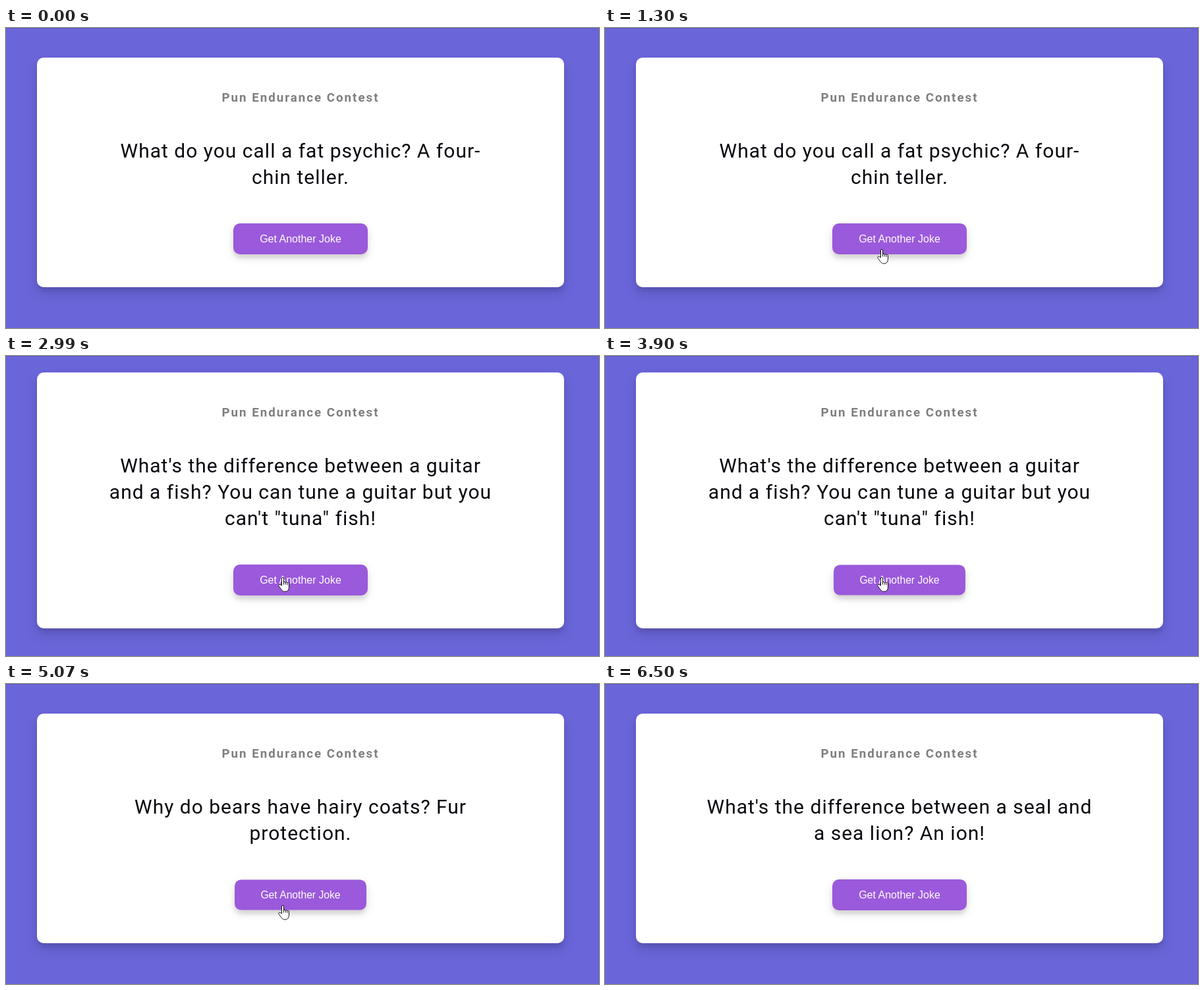
Write an HTML page that moves like this. It is 900 px wide and 456 px high and loops after 6.63 s.

```html
<!DOCTYPE html>
<html lang="en">
<head>
<meta charset="utf-8">
<title>Joke card</title>
<style>
  html, body { margin: 0; width: 100%; height: 100%; overflow: hidden; }
  body {
    position: relative;
    background: #6a65d9;
    box-shadow: inset -1px 1px #605bc8;
    font-family: Roboto, sans-serif;
  }
  #card {
    position: absolute;
    left: 47px;
    width: 800px;
    box-sizing: border-box;
    padding: 50px 20px;
    border-radius: 10px;
    background: #fff;
    box-shadow: 0 10px 20px rgba(0, 0, 0, .1), 0 6px 6px rgba(0, 0, 0, .1);
    text-align: center;
  }
  h3 {
    margin: 0;
    font-size: 18.72px;
    line-height: 22px;
    letter-spacing: 2px;
    opacity: .5;
  }
  #joke {
    margin: 50px 0;
    font-size: 30px;
    line-height: 40px;
    letter-spacing: 1px;
    white-space: pre;
    color: #08080f;
  }
  #button {
    width: 204px;
    margin: 0 auto;
    border-radius: 10px;
    background: #9b59db;
    box-shadow: 0 5px 15px rgba(0, 0, 0, .1), 0 6px 6px rgba(0, 0, 0, .1);
    color: #fff;
    font: 16px/47px "Liberation Sans", Arial, sans-serif;
  }
  svg {
    position: absolute;
    left: 0;
    top: 0;
    overflow: visible;
    fill: #fff;
    stroke: #111;
    stroke-linejoin: round;
  }
</style>
</head>
<body>
<div id="card">
  <h3>Pun Endurance Contest</h3>
  <div id="joke"></div>
  <div id="button">Get Another Joke</div>
</div>
<svg id="cursor" width="20" height="24">
  <path id="arrow" d="M.5 .5V17L4.3 13.5 7 19.5 9.6 18.4 7 12.5H12Z"/>
  <path id="hand" transform="translate(-6 0)" d="M5.5 13V2a1.5 1.5 0 0 1 3 0V8.5a1.4 1.4 0 0 1 2.8.3 1.4 1.4 0 0 1 2.7.5 1.3 1.3 0 0 1 2.5.7V15c0 4-2 7-5.5 7H9.5C6.5 22 5 19 1 13.5 0 11.5 2.5 10.5 4 12ZM8.5 8.5V11.5M11.3 9V11.5M14 9.5V12"/>
</svg>
<script>
  const LOOP = 6630, STEP = 130;
  const REST = [419, 336];

  const jokes = [
    { at: 0, top: 45, text: "What do you call a fat psychic? A four-\nchin teller." },
    { at: 2990, top: 25, text: "What's the difference between a guitar\nand a fish? You can tune a guitar but you\ncan't \"tuna\" fish!" },
    { at: 4160, top: 45, text: "Why do bears have hairy coats? Fur\nprotection." },
    { at: 5330, top: 45, text: "What's the difference between a seal and\na sea lion? An ion!" }
  ];
  const presses = [2600, 3900, 5070];

  // Cursor positions, one per step
  const enter = { at: 390, path: [[34, 415], [125, 402], [235, 383], [332, 362], [394, 346], [414, 339], [418, 337], REST] };
  const leave = { at: 5590, path: [[338, 364], [220, 417], [120, 433], [46, 439], [6, 443]] };

  const $ = id => document.getElementById(id);
  const show = (el, on) => el.style.display = on ? "" : "none";

  function cursorAt(t) {
    if (t < enter.at) return null;
    if (t < leave.at) return enter.path[(t - enter.at) / STEP] || REST;
    return leave.path[(t - leave.at) / STEP];
  }

  function draw(now) {
    const t = Math.floor(now % LOOP / STEP) * STEP;
    const joke = jokes.findLast(j => j.at <= t);
    $("joke").textContent = joke.text;
    $("card").style.top = joke.top + "px";
    $("button").style.transform = presses.includes(t) ? "scale(.98)" : "";

    const pos = cursorAt(t);
    show($("cursor"), pos);
    if (pos) {
      const [x, y] = pos;
      const over = x >= 345 && x < 549 && y < 344;
      show($("hand"), over);
      show($("arrow"), !over);
      $("cursor").style.transform = `translate(${x}px, ${y}px)`;
    }
  }

  const start = performance.now();
  function tick() {
    draw(performance.now() - start);
    requestAnimationFrame(tick);
  }
  tick();
</script>
</body>
</html>
```
